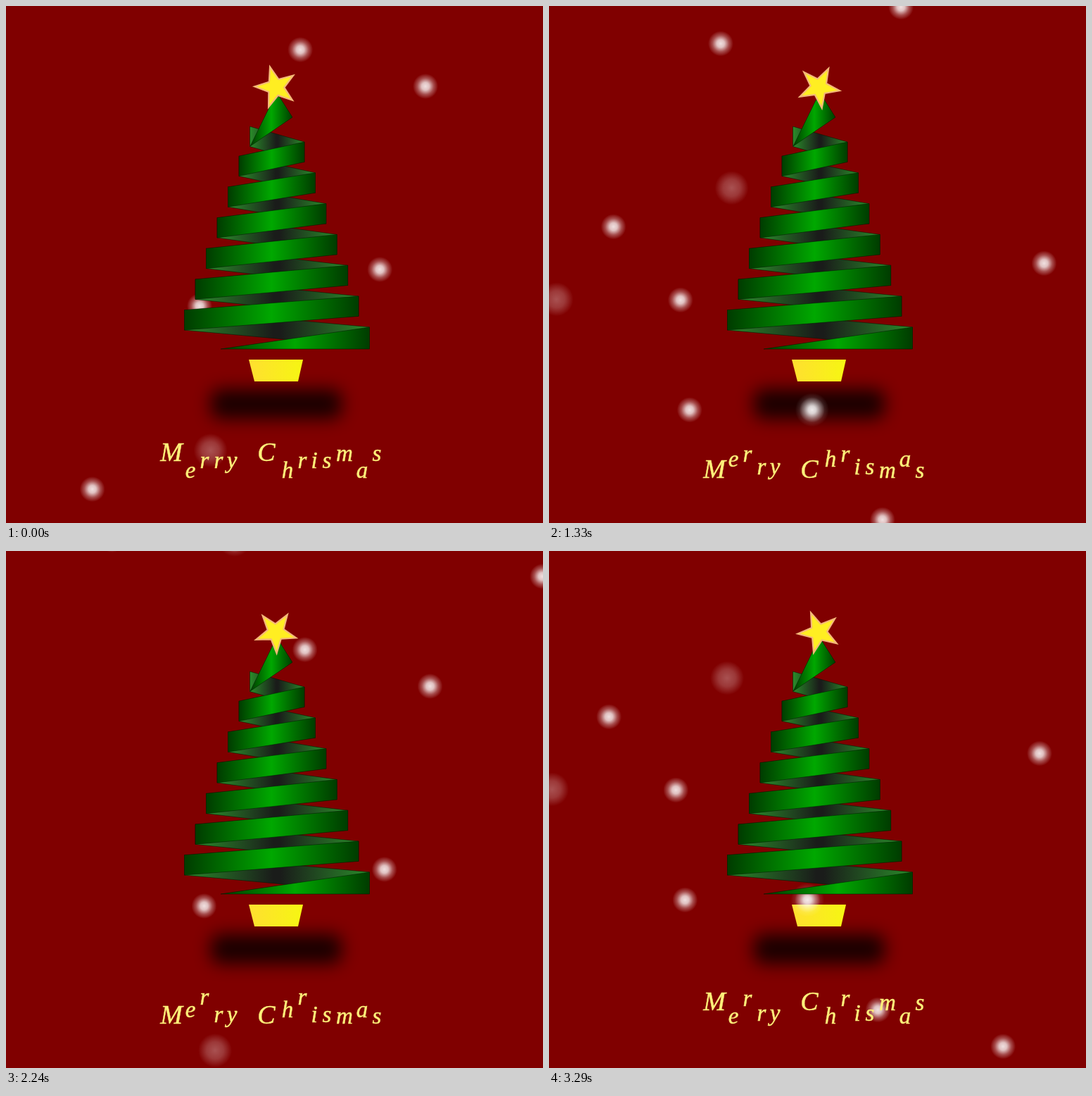
Animation of 763 by 734 pixels, one loop 3.36 s. Source, as an HTML page:

```html
<!DOCTYPE html>
<html lang="en">
<head>
<meta charset="utf-8">
<title>Merry Chrismas</title>
<style>
  html, body { margin: 0; width: 100%; height: 100%; overflow: hidden; background: #800000; }
  svg { display: block; }
  #greeting {
    font: italic 33px "Liberation Serif", "Times New Roman", serif;
    fill: #fdf07a; stroke: #fdf07a; stroke-width: .5; text-anchor: middle;
  }
  #greeting .capital { font-size: 38px; }
</style>
</head>
<body>
<svg width="763" height="734" viewBox="0 0 763 734">
  <defs>
    <linearGradient id="front">
      <stop offset="0" stop-color="#003c00"/>
      <stop offset=".5" stop-color="#00a800"/>
      <stop offset="1" stop-color="#003c00"/>
    </linearGradient>
    <linearGradient id="back">
      <stop offset="0" stop-color="#2a8c2a"/>
      <stop offset=".48" stop-color="#1a1c1a"/>
      <stop offset=".52" stop-color="#1a1c1a"/>
      <stop offset="1" stop-color="#2a8c2a"/>
    </linearGradient>
    <linearGradient id="gold">
      <stop offset="0" stop-color="#ffdf30"/>
      <stop offset="1" stop-color="#f6f612"/>
    </linearGradient>
    <radialGradient id="bright">
      <stop offset="0" stop-color="#fff" stop-opacity=".88"/>
      <stop offset=".3" stop-color="#fff" stop-opacity=".76"/>
      <stop offset=".65" stop-color="#fff" stop-opacity=".3"/>
      <stop offset="1" stop-color="#fff" stop-opacity="0"/>
    </radialGradient>
    <radialGradient id="faint">
      <stop offset="0" stop-color="#fff" stop-opacity=".32"/>
      <stop offset=".5" stop-color="#fff" stop-opacity=".22"/>
      <stop offset="1" stop-color="#fff" stop-opacity="0"/>
    </radialGradient>
    <filter id="blur" x="-30%" y="-150%" width="160%" height="400%">
      <feGaussianBlur stdDeviation="12"/>
    </filter>
  </defs>
  <rect width="763" height="734" fill="#800000"/>
  <rect x="291" y="544" width="186" height="42" rx="14" opacity=".8" filter="url(#blur)"/>
  <path d="M345 502H422L415 533H353Z" fill="url(#gold)"/>
  <g id="snow"></g>
  <g id="tree" stroke="#001800" stroke-opacity=".5" stroke-width="1"></g>
  <g id="star"></g>
  <g id="greeting"></g>
</svg>
<script>
const FRAME = 70, FRAMES = 48;
const PERIOD = 1040;            // height of the repeating snowfall
const FALL = PERIOD / 120;      // pixels per tick, four ticks to a frame
const BOTTOM = 736;
const $ = id => document.getElementById(id);
const mod = (a, n) => ((a % n) + n) % n;

function add(parent, tag, attrs, text = '') {
  const el = document.createElementNS('http://www.w3.org/2000/svg', tag);
  for (const name in attrs) el.setAttribute(name, attrs[name]);
  el.textContent = text;
  return parent.appendChild(el);
}

// Ribbon tree: each turn is wider and lower than the one above
const tree = $('tree');
const band = (fill, ...points) => add(tree, 'polygon', { points: points.join(' '), fill: `url(#${fill})` });
const leftEdge = k => [346.5 - 15.5 * k, k ? 169.4 + 43.7 * k : 171];
const rightEdge = k => [424 + 15.4 * k, 193 + 43.8 * k];
const low = ([x, y]) => [x, y + 28.5];

for (let k = 0; k < 7; k++) {
  const l = leftEdge(k), r = rightEdge(k);
  band('back', l, r, low(r), low(l));
}
for (let k = 1; k < 7; k++) {
  const l = leftEdge(k), r = rightEdge(k - 1);
  band('front', l, r, low(r), low(l));
}
band('front', [305, 487], [516.5, 456], [516.5, 487]);
band('front', [388, 128], [407, 158], [347, 199], [379, 134]);

// Star
const starPoints = Array.from({ length: 10 }, (_, i) => {
  const r = i % 2 ? 12 : 30, a = i * Math.PI / 5;
  return [(r * Math.sin(a)).toFixed(2), (-r * Math.cos(a)).toFixed(2)];
}).join(' ');
add($('star'), 'polygon', { points: starPoints, fill: '#ffee22', stroke: '#f4b878', 'stroke-width': 2.2 });

// Snow: [x where the flake crosses the top, starting height, look]
const flakes = [
  [65.5, 686], [673, 738], [152, 790], [152, 946], [326, 946], [759, 998],
  [413, 62], [586.5, 114], [500, 374], [239.5, 426],
  [238, 631, 'faint'], [-24, 789, 'faint'], [326, 946, 'faint']
].map(([x, y, look = 'bright']) => ({
  x, y, el: add($('snow'), 'circle', { r: look === 'faint' ? 24 : 18, fill: `url(#${look})` })
}));

// Letters: [character, x, tick at which it starts downward]
const letters = [
  ['M', 235, 11], ['e', 262, 23], ['r', 282, 41], ['r', 302, 17], ['y', 321, 17],
  ['C', 370, 11], ['h', 400, 23], ['r', 421, 41], ['i', 438, 17], ['s', 456, 17],
  ['m', 481, 11], ['a', 506, 23], ['s', 527, 11]
].map(([char, x, start]) => ({
  start,
  el: add($('greeting'), 'text', { x, class: char < 'a' ? 'capital' : 'small' }, char)
}));

// cubic-bezier(.25, .1, .25, 1)
function ease(x) {
  const curve = (a, b, u) => 3 * a * u * (1 - u) ** 2 + 3 * b * u * u * (1 - u) + u ** 3;
  let lo = 0, hi = 1;
  for (let i = 0; i < 24; i++) {
    const mid = (lo + hi) / 2;
    if (curve(.25, .25, mid) < x) lo = mid; else hi = mid;
  }
  return curve(.1, 1, lo);
}

function bounce(phase) {
  return phase < 24 ? ease(phase / 24) : 1 - ease(phase / 24 - 1);
}

function draw(time) {
  const frame = Math.floor(mod(time, FRAME * FRAMES) / FRAME);
  // the middle stretch runs one tick ahead
  const tick = 4 * frame + (frame >= 10 && frame < 44 ? 1 : 0);

  for (const { x, y, el } of flakes) {
    const cy = mod(y + FALL * tick - BOTTOM, PERIOD) + BOTTOM - PERIOD;
    el.setAttribute('cx', x + cy / 12);
    el.setAttribute('cy', cy);
  }
  $('star').setAttribute('transform', `translate(383.3 115.3) rotate(${1.5 * tick - 16})`);
  for (const { start, el } of letters) {
    el.setAttribute('y', 641.5 + 29.5 * bounce(mod(tick - start, 48)));
  }
}

const began = performance.now();
function loop() {
  draw(performance.now() - began);
  requestAnimationFrame(loop);
}
loop();
</script>
</body>
</html>
```
